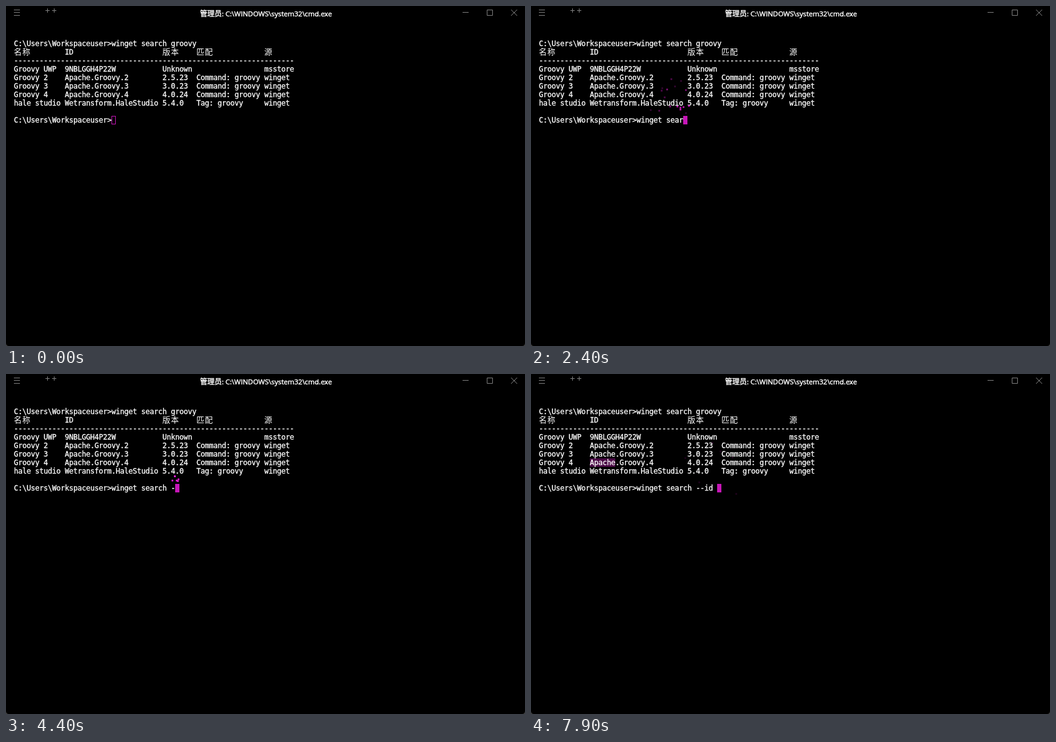
An HTML page for the animation above (8 s loop, 856x560 px).

```html
<!DOCTYPE html>
<html lang="zh">
<head>
<meta charset="utf-8">
<title>Terminal</title>
<style>
html, body { margin: 0; width: 100%; height: 100%; overflow: hidden; background: #000; }
svg { display: block; }
text { fill: #fff; stroke: #fff; white-space: pre; }
.mono { font: 12px "DejaVu Sans Mono", monospace; stroke-width: .3; }
.cjk { font: 13px "Noto Sans CJK SC", "Noto Sans CJK", sans-serif; stroke-width: 0; }
.title { font: 11.5px "Open Sans", "Noto Sans", sans-serif; stroke-width: .45; }
.title.han { font: 12px "Noto Sans CJK SC", "Noto Sans CJK", sans-serif; }
.icon { fill: none; stroke: #808080; stroke-width: 1; }
</style>
</head>
<body>
<svg id="stage" width="856" height="560" viewBox="0 0 856 560" xmlns="http://www.w3.org/2000/svg">
  <rect width="856" height="560" fill="#000"/>
  <path d="M0 555Q0 560 5 560H0ZM856 555Q856 560 851 560H856Z" fill="#444"/>
  <path class="icon" d="M13 6.5H23M13 10.5H23M13 15.5H23"/>
  <path class="icon" d="M65 7.5H72M68.5 4V11M76 7.5H83M79.5 4V11"/>
  <path class="icon" d="M753 10.5H763M793.5 6.5H802.5V15.5H793.5ZM833 6L843 16M843 6L833 16"/>
  <text class="title han" x="320" y="17">管理员</text>
  <text class="title" x="356" y="17">: C:\WINDOWS\system32\cmd.exe</text>
  <rect id="select" height="14" fill="rgb(74,8,69)"/>
  <g id="rows"></g>
  <rect id="cursor" y="181.5" width="6" height="13" stroke="rgb(198,22,183)"/>
  <g id="sparks" fill="rgb(248,28,229)"></g>
</svg>
<script>
const LOOP = 8000, STEP = 100;
const CELL = 7, LEFT = 13, TOP = 55, LINE = 14;
const PROMPT = 'C:\\Users\\Workspaceuser>';
const GRAVITY = 0.075, FADE = 0.96, LIFE = 56, SPAWN_Y = 183;

const $ = id => document.getElementById(id);
const colX = col => LEFT + CELL * col;

function add(parent, tag, attrs) {
  const el = document.createElementNS('http://www.w3.org/2000/svg', tag);
  set(el, attrs);
  return parent.appendChild(el);
}

function set(el, attrs) {
  for (const k in attrs) el.setAttribute(k, attrs[k]);
}

// Text on the terminal grid; wide characters take two cells.
function print(row, col, str, wide, cells = str.length) {
  const xs = Array.from({ length: cells }, (_, i) => colX(col + i * (wide ? 2 : 1)));
  const el = add($('rows'), 'text', {
    class: wide ? 'cjk' : 'mono', x: xs.join(' '), y: TOP + LINE * row + 11
  });
  el.textContent = str;
  return el;
}

const COLS = [0, 12, 35, 43, 59];
const table = [
  ['Groovy UWP', '9NBLGGH4P22W', 'Unknown', '', 'msstore'],
  ['Groovy 2', 'Apache.Groovy.2', '2.5.23', 'Command: groovy', 'winget'],
  ['Groovy 3', 'Apache.Groovy.3', '3.0.23', 'Command: groovy', 'winget'],
  ['Groovy 4', 'Apache.Groovy.4', '4.0.24', 'Command: groovy', 'winget'],
  ['hale studio', 'Wetransform.HaleStudio', '5.4.0', 'Tag: groovy', 'winget']
];

print(0, 0, PROMPT + 'winget search groovy');
['名称', 'ID', '版本', '匹配', '源'].forEach((s, i) => print(1, COLS[i], s, s !== 'ID'));
print(2, 0, '-'.repeat(66));
table.forEach((cells, r) => cells.forEach((s, i) => s && print(r + 3, COLS[i], s)));
const input = print(9, 0, PROMPT, false, 50);

let seed = 7;
function rand() {
  seed = (seed * 16807) % 2147483647;
  return seed / 2147483647;
}

// Typing in runs: first key time, text, time between keys.
const runs = [
  [800, 'winget ', 92],
  [1700, 'sear', 180],
  [2410, 'ch ', 140],
  [4310, '-', 0],
  [4520, '-id ', 113]
];
const keys = runs.flatMap(([start, text, gap]) =>
  [...text].map((ch, i) => ({ ch, time: start + i * gap })));

// Every key throws a burst of sparks up from the cursor.
const sparks = keys.flatMap(({ time }, i) =>
  Array.from({ length: 4 + Math.floor(rand() * 3) }, () => ({
    born: time,
    x: colX(PROMPT.length + i + 1),
    vx: rand() * 2 - 1,
    vy: rand() * 2 - 3.5,
    el: add($('sparks'), 'rect', { width: 3, height: 3 })
  })));

function drawSparks(t, last) {
  for (const s of sparks) {
    const n = Math.min(LIFE, (t - s.born) * 0.06);
    // The newest burst stays faintly on screen once it has burnt out.
    const live = n >= 0 && (n < LIFE || s.born === last);
    set(s.el, live ? {
      opacity: FADE ** n,
      x: Math.round(s.x + s.vx * n - 1),
      y: Math.round(SPAWN_Y + s.vy * n + GRAVITY * n * n / 2 - 1)
    } : { opacity: 0 });
  }
}

// Selection: start, screen row, number of cells.
const picks = [[0, 5, 0], [6900, 5, 1], [7700, 6, 0], [7800, 6, 1], [7900, 6, 6]];

function draw(t) {
  const typed = keys.filter(k => k.time <= t);
  const line = PROMPT + typed.map(k => k.ch).join('');
  if (input.textContent !== line) input.textContent = line;
  set($('cursor'), {
    x: colX(line.length) + 0.5,
    fill: t < 200 ? 'none' : 'rgb(198,22,183)'
  });

  const [, row, cells] = picks.filter(p => p[0] <= t).pop();
  set($('select'), { x: colX(COLS[1]), y: TOP + LINE * row, width: cells * CELL });

  drawSparks(t, typed.length ? typed[typed.length - 1].time : -1);
}

const start = performance.now();
function frame() {
  const t = (performance.now() - start) % LOOP;
  draw(Math.floor(t / STEP) * STEP);
  requestAnimationFrame(frame);
}
draw(0);
requestAnimationFrame(frame);
</script>
</body>
</html>
```
